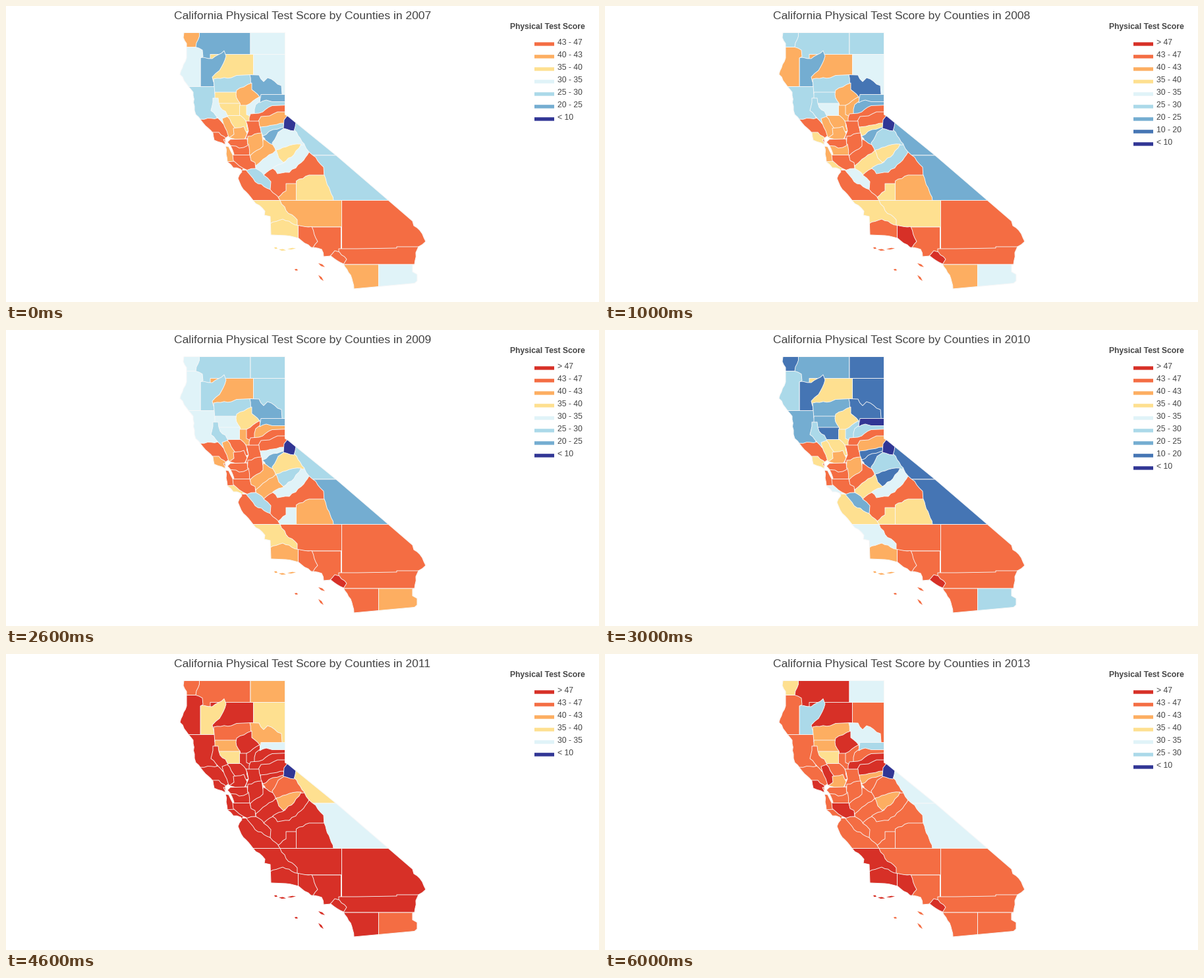
Animation of 900 by 450 pixels, one loop 7 s. Source, as a matplotlib script:

```python
import random

import matplotlib.pyplot as plt
import numpy as np
from matplotlib.animation import FuncAnimation
from matplotlib.patches import Polygon, Rectangle

W, H, DPI = 900, 450, 100
FIRST_YEAR, YEARS = 2007, 7
BANDS = ["> 47", "43 - 47", "40 - 43", "35 - 40", "30 - 35",
         "25 - 30", "20 - 25", "10 - 20", "< 10"]
COLORS = ["#d73027", "#f46d43", "#fdae61", "#fee090", "#e0f3f8",
          "#abd9e9", "#74add1", "#4575b4", "#313695"]
USUAL = [1, 1, 1, 1, 0, 1, 1]  # statewide band in each year
INK, BORDER = "#444444", "#f8f8f8"
rng = random.Random(4)

plt.rcParams["font.family"] = "Liberation Sans"
fig = plt.figure(figsize=(W / DPI, H / DPI), dpi=DPI, facecolor="white")
ax = fig.add_axes([0, 0, 1, 1])
ax.set_xlim(0, W)
ax.set_ylim(H, 0)
ax.axis("off")


def px(size):
    return size * 72 / DPI


def label(x, y, text, size, **style):
    return ax.text(x, y, text, fontsize=px(size), color=INK, va="baseline", **style)


def roughen(points):
    """Wiggle natural borders; surveyed lines (level, upright or long) stay straight."""
    rough = []
    for a, b in zip(points, points[1:] + points[:1]):
        a, b = np.array(a), np.array(b)
        step = b - a
        length = np.hypot(*step)
        rough.append(a)
        if min(abs(step)) < 2 or length > 45:
            continue
        normal = np.array([-step[1], step[0]]) / length
        parts = int(length // 5)
        for k in range(1, parts):
            rough.append(a + step * k / parts + normal * rng.uniform(-1.1, 1.1))
    return rough


def shape(points, **style):
    return ax.add_patch(Polygon(points, joinstyle="round", snap=False, **style))


coast = roughen([
    (270, 40.5), (423.5, 40.5), (423.5, 165), (428.5, 168), (501, 227), (580.5, 295.5),
    (617, 327), (619, 334), (628, 341), (637, 358), (626, 366), (622, 375), (620, 393),
    (617, 394), (617, 404), (624, 408), (624, 418), (620, 421.5), (528, 430), (523, 409),
    (512, 392), (493, 380), (482, 381), (479, 370), (463, 367), (444, 353), (425, 349),
    (402, 348), (401, 320), (392, 318), (393, 312), (375, 295.5), (357, 274), (352, 262),
    (358, 252), (356, 248), (345, 246), (336, 237), (333, 213), (338, 214), (344, 226),
    (346, 225), (343, 217), (336, 207), (341, 202), (337, 198), (333, 201), (333, 211),
    (316, 204), (314, 193), (296, 174), (288, 165), (286, 152), (284, 131), (277, 122.5),
    (264, 104), (274, 79), (274, 57), (269, 48)])
mainland = shape(coast, fill=False, ec=BORDER, lw=px(1), zorder=3)
counties = []


def county(name, bands, *points, isles=()):
    """Add a county; two points make a box, missing bands follow the state."""
    if len(points) == 2:
        (x0, y0), (x1, y1) = points
        points = [(x0, y0), (x1, y0), (x1, y1), (x0, y1)]
    land = shape(roughen(list(points)), ec=BORDER, lw=px(0.9), zorder=2, label=name)
    land.set_clip_path(mainland)
    shapes = [land]
    for x0, y0, x1, y1 in isles:
        x, y = (x0 + x1) / 2, (y0 + y1) / 2
        shapes.append(shape([(x0, y0), (x + 1, y - 1.3), (x1, y1), (x - 1, y + 1.3)], lw=0))
    counties.append((bands + USUAL[len(bands):], shapes))


# Each county covers the loose inner edges of those before it,
# and the coast trims whatever reaches into the sea.

# North
county("Siskiyou", [6, 5, 5, 6, 1, 2, 0], (280, 35), (371, 80))
county("Modoc", [4, 5, 5, 7, 2, 3, 4], (371, 35), (430, 73.5))
county("Lassen", [4, 4, 5, 7, 3, 0, 1], (375.5, 73.5), (430, 136))
county("Shasta", [3, 2, 2, 3, 0, 0, 0], (310, 73.5), (375.5, 115))
county("Trinity", [6, 6, 5, 7, 3, 2, 5], (295, 78), (313, 80), (331, 68), (334, 76),
       (324, 98), (313, 108), (316, 118), (316, 123), (295, 123))
county("Humboldt", [4, 2, 4, 5], (260, 62.5), (288, 62.5), (298, 67), (299, 77),
       (295, 79), (295, 123), (260, 122.5))
county("Del Norte", [2, 5, 4, 7, 1, 1, 3], (260, 35), (293.5, 35), (293.5, 46), (289, 56),
       (288, 62.5), (260, 62.5))
county("Mendocino", [5, 5, 4, 6], (270, 122.5), (320, 180))
county("Tehama", [5, 5, 5, 6, 1, 1, 2], (315, 111), (342, 109), (350, 105.5),
       (372, 104.5), (373, 117), (360, 134), (317, 134), (316, 122))
county("Plumas", [6, 7, 6, 7, 2, 4, 4], (370, 104.5), (384, 105), (391, 115), (397, 109),
       (418, 121), (419.5, 140), (384, 140), (372, 126))
county("Glenn", [3, 5, 4, 6, 2, 2, 2], (317, 131), (357, 150))
county("Colusa", [3, 4, 4, 7, 3, 3, 3], (322, 148), (358, 170))
county("Butte", [2, 2, 3, 3, 0, 1, 0], (373, 117), (373, 127), (385, 138), (366, 153),
       (356, 153), (349, 134), (350, 128), (361, 123))
county("Sutter", [3, 2, 2, 3], (354.5, 151), (370, 178))
county("Yuba", [4, 2, 1, 5], (365, 151), (385, 138), (387, 147), (375, 168), (365, 165))

# Sierra and central valley
county("Nevada", [5, 6, 2, 5], (377, 164), (379, 150), (395, 141), (430, 141),
       (430, 156), (390, 167))
county("Sierra", [6, 6, 6, 8, 4, 6, 5], (387, 134.5), (430, 134.5), (430, 145.5),
       (404, 145.5), (395, 143), (385, 147))
county("Placer", [1, 1, 1, 1, 0, 0, 0], (371, 164), (384, 163), (404, 151.5),
       (430, 150.5), (430, 170), (383, 178), (369, 176))
county("El Dorado", [2, 1, 1, 2, 0, 0, 0], (383, 175), (387, 168), (400, 167), (412, 161),
       (430, 161), (430, 182), (386, 188))
county("Yolo", [3, 2, 1, 3], (330, 166.5), (356, 166.5), (365, 176), (368, 190), (340, 195))
county("Sacramento", [], (364, 175), (384, 175), (388, 196), (363, 203), (368, 190))
county("Amador", [5, 3, 4, 7, 0, 1, 2], (386, 184), (421, 178), (425, 188), (393, 200),
       (387, 191))
county("Calaveras", [6, 6, 6, 7, 1], (389, 198), (405, 188), (424, 183), (422, 195),
       (404, 218))
county("Mono", [5, 6, 5, 7, 3, 2, 4], (430, 165), (510, 165), (510, 227), (455, 227),
       (435, 190))
county("Inyo", [5, 6, 6, 7, 4, 2, 4], (450, 227), (590, 295.5))
county("Tuolumne", [4, 5, 3, 5, 1], (404, 208), (413, 192), (422, 186), (437, 188),
       (453, 210), (450, 218), (410, 224))
county("Alpine", [8] * YEARS, (422, 173), (428, 165), (440, 177), (437, 190), (421, 186))
county("San Joaquin", [2, 1, 1, 2], (367, 198), (388, 193), (394, 220), (371, 230),
       (366, 222))
county("Stanislaus", [2, 1, 2], (371, 227), (390, 213), (390, 202), (405, 211),
       (410, 222), (380, 244), (369, 233))
county("Madera", [4, 5, 4, 4], (403, 247), (421, 236), (440, 213), (453, 211), (460, 222),
       (455, 240), (412, 262))
county("Merced", [4, 3, 2, 3], (379, 243), (390, 233), (409, 220), (416, 222), (424, 237),
       (405, 246), (404, 258), (390, 262), (379, 250))
county("Mariposa", [3, 3, 5, 7, 2, 1, 2], (410, 219), (430, 212), (448, 210), (437, 226),
       (421, 238), (414, 231))

# Bay area
county("Sonoma", [], (290, 173), (322, 170), (340, 190), (340, 202), (305, 202))
county("Lake", [4, 5, 5, 5], (314, 140), (322, 140), (325, 154), (333, 160), (337, 168),
       (329, 178), (311, 159))
county("Napa", [2, 2, 2, 3, 0, 1, 0], (328, 171), (336, 168), (348, 186), (346, 198),
       (339, 202), (332, 184))
county("Marin", [1, 3, 2, 3, 0, 0, 0], (305, 192), (323, 192), (335, 202), (335, 215),
       (305, 215))
county("Solano", [2, 2, 1, 2, 0, 2, 2], (345, 186), (361, 183), (366, 194), (361, 204),
       (335, 201), (346, 195))
county("San Mateo", [2, 2], (325, 210), (350, 242))
county("Alameda", [1, 2], (338, 210), (368, 210), (371, 230), (347, 230), (344, 220))
county("Contra Costa", [], (330, 203), (366, 202), (367, 212), (354, 216), (349, 213),
       (336, 212))
county("Santa Cruz", [1, 3, 3, 4], (330, 237), (347, 236), (361, 246), (356, 254),
       (330, 254))
county("Monterey", [1, 1, 1, 3], (345, 249.5), (366, 249.5), (400, 270), (416, 290),
       (416, 295.5), (345, 295.5))
county("San Benito", [5, 4, 5, 6], (364, 249), (379, 247), (406, 266), (401, 279),
       (378, 267))
county("Santa Clara", [1, 1, 1, 1, 0, 0, 0], (344, 226.5), (370, 226.5), (372, 235),
       (378, 238), (379, 247), (366, 249.5), (354, 243), (345, 235))

# South
county("Kern", [2, 3], (400, 295.5), (509.5, 336))
county("Fresno", [], (391, 257), (405, 247), (412, 255), (430, 253), (448, 238),
       (460, 222), (470, 230), (482, 245), (483, 260), (440, 275), (414, 291), (401, 279),
       (402, 267))
county("Kings", [2, 3, 4, 3], (413, 291), (425, 281), (425, 270), (445, 270),
       (445, 295.5), (416, 295.5))
county("Tulare", [3, 2, 2, 3], (440.5, 266), (460, 257), (483, 257), (497, 295.5),
       (440.5, 295.5))
county("San Bernardino", [], (509.5, 295.5), (650, 372))
county("Los Angeles", [], (455, 336), (508.5, 390),
       isles=[(474, 391, 484, 397), (474, 409, 482, 418), (438, 400, 443, 402)])
county("San Luis Obispo", [3, 3, 3, 4, 0, 0, 0], (365, 295.5), (416, 295.5), (425, 311),
       (442, 325), (442, 336), (390, 336))
county("Santa Barbara", [3, 1, 2, 2, 0, 0, 0], (390, 334), (420, 324), (443.5, 333.5),
       (443.5, 360), (390, 360),
       isles=[(407, 367, 412, 369), (414, 370, 425, 371.5), (427, 369.5, 440, 368.5)])
county("Ventura", [1, 0, 1, 1, 0, 0, 0], (443.5, 333.5), (464, 335.5), (473, 358),
       (461, 372), (443.5, 372))
county("Riverside", [], (505, 369), (533, 369), (593, 368), (593, 366), (640, 366),
       (640, 393), (505, 393))
county("San Diego", [2, 2], (500, 393), (565.5, 440))
county("Imperial", [4, 4, 2, 5, 1, 2], (565.5, 393), (640, 440))
county("Orange", [1, 0, 0, 0, 0, 0, 0], (490, 382), (499, 372), (506, 374), (517, 385),
       (512, 393), (500, 393))

title = label(W / 2, 20, "", 17.45, ha="center")
label(765, 35, "Physical Test Score", 12.1, weight="bold")
swatches, names = [], []
for i in range(len(BANDS)):
    bar = Rectangle((802, 55.2 + 19 * i), 30, 5.4, lw=0, snap=False)
    swatches.append(ax.add_patch(bar))
    names.append(label(837, 59 + 19 * i, "", 12.2))


def draw(year):
    title.set_text(f"California Physical Test Score by Counties in {FIRST_YEAR + year}")
    for bands, shapes in counties:
        for part in shapes:
            part.set_facecolor(COLORS[bands[year]])

    # The key lists only the bands present this year.
    used = sorted({bands[year] for bands, _ in counties})
    for row, (swatch, name) in enumerate(zip(swatches, names)):
        shown = row < len(used)
        swatch.set_visible(shown)
        name.set_visible(shown)
        if shown:
            swatch.set_facecolor(COLORS[used[row]])
            name.set_text(BANDS[used[row]])
    return []


anim = FuncAnimation(fig, draw, frames=YEARS, interval=1000, repeat=True, blit=False)
plt.show()
```
